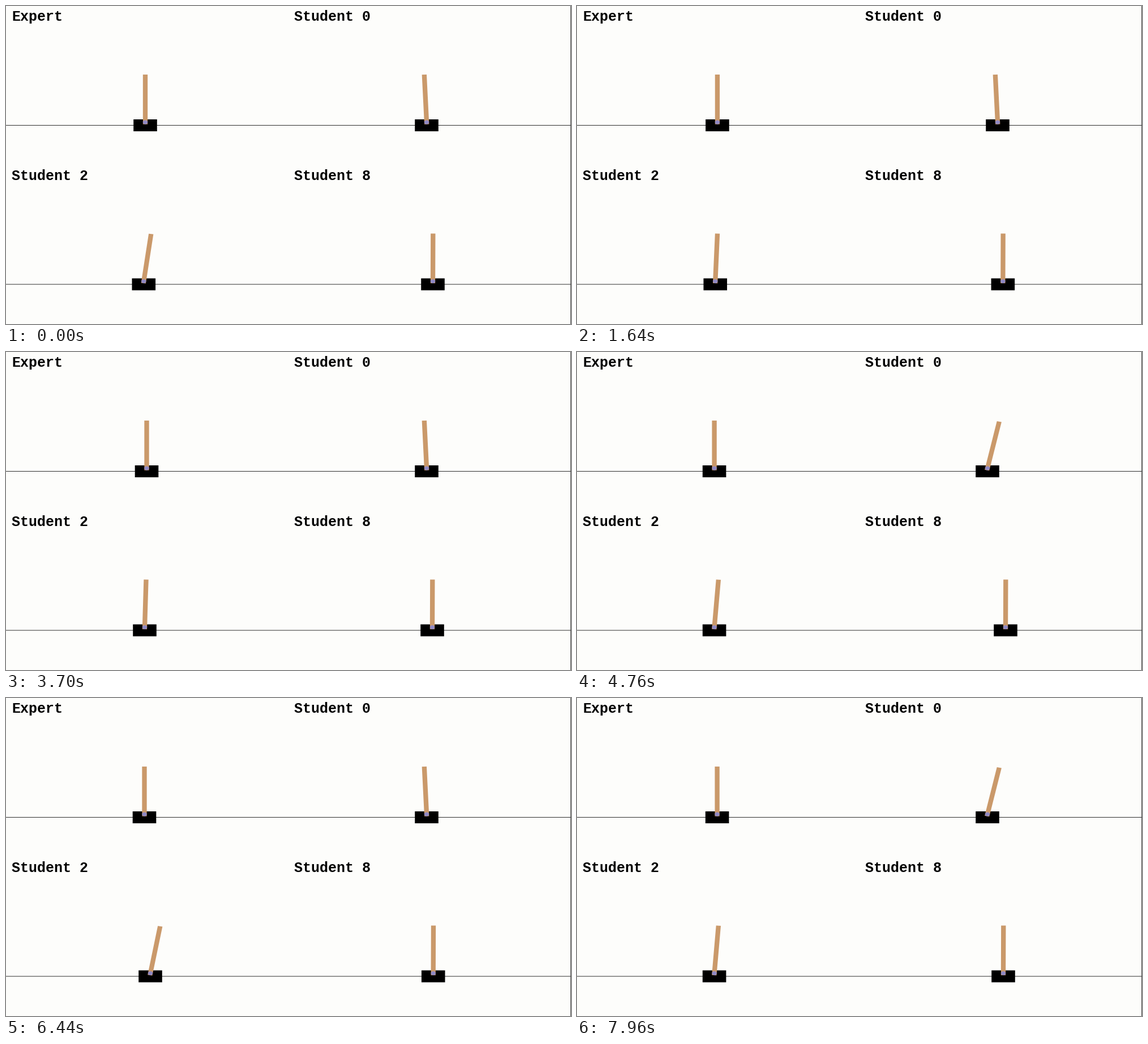
These frames come from a looping animation (998 by 561 pixels, 8 s). A matplotlib script:

```python
import numpy as np
import matplotlib.pyplot as plt
from matplotlib.animation import FuncAnimation
from matplotlib.patches import Ellipse, Polygon, Rectangle

W, H, DPI = 998, 561, 100
PANE_H = H / 2
FRAMES, STEP = 400, 20
SX, SY = W / 1200, PANE_H / 400      # a 600 x 400 view squeezed into each pane
PT = 72 / DPI
KEY_TIMES = [0, 900, 2360, 3700, 4760, 6440, 7960]


def ease(t, values):
    """Cosine easing from one key time to the next."""
    pos = np.interp(t, KEY_TIMES, range(len(KEY_TIMES)))
    k = min(int(pos), len(KEY_TIMES) - 2)
    u = (1 - np.cos(np.pi * (pos - k))) / 2
    return values[k] + (values[k + 1] - values[k]) * u


# Each pose is the cart centre in pixels and the pole angle in radians.
def expert(t):
    return ease(t, [246, 251, 245, 248.5, 242.6, 244.5, 247.6]), 0


def student_0(t):
    # pushes left at every step until the pole passes twelve degrees
    n = int(0.75 + t / 48.48) % 11
    push = n * (n - 1)
    return 743 - 0.2 * push, -0.042 + 0.0028 * push


def student_2(t):
    # drifts left, then chases the falling pole to the right
    n = int(np.interp(t, KEY_TIMES, [10.5, 25.5, 60.5, 84.5, 109.5, 143.5, 172.5])) % 21
    x = 245 - 0.774 * n + 0.0322 * n**2 + 0.00282 * n**3
    return x, 0.025 + 0.013 * n - 0.00025 * n**2


def student_8(t):
    return ease(t, [754, 749.8, 754.8, 753, 757, 754.7, 753]), 0.003


class CartPole:
    def __init__(self, pose, top):
        self.pose = pose
        self.pivot = top + PANE_H - 107.5 * SY
        self.cart = Rectangle((0, top + 200), 50 * SX, 30 * SY, fc="black",
                              lw=0, snap=False, zorder=2)
        self.pole = Polygon(np.zeros((4, 2)), fc="#ca996a", lw=0, snap=False, zorder=3)
        self.axle = Ellipse((0, self.pivot), 10 * SX, 10 * SY, fc="#9089c4",
                            lw=0, zorder=4)
        self.parts = [self.cart, self.pole, self.axle]
        for part in self.parts:
            ax.add_patch(part)

    def place(self, t):
        x, angle = self.pose(t)
        c, s = np.cos(angle), np.sin(angle)
        u = np.array([-5, -5, 5, 5])
        v = np.array([-5, 120, 120, -5])
        self.pole.set_xy(np.column_stack([x + SX * (u * c + v * s),
                                          self.pivot - SY * (v * c - u * s)]))
        self.cart.set_x(x - 25 * SX)
        self.axle.set_center((x, self.pivot))
        return self.parts


fig = plt.figure(figsize=((W + 0.01) / DPI, (H + 0.01) / DPI), dpi=DPI,
                 facecolor="#fdfdfb")
ax = fig.add_axes([0, 0, 1, 1])
ax.set_xlim(0, W)
ax.set_ylim(H, 0)
ax.axis("off")

panes = [("Expert", expert), ("Student 0", student_0),
         ("Student 2", student_2), ("Student 8", student_8)]
carts = []
for i, (name, pose) in enumerate(panes):
    left, top = i % 2 * W / 2, i // 2 * PANE_H
    ax.text(left + 10, top + 26.2, name, family="Liberation Mono", weight="bold",
            size=25 * PT, color="black", va="baseline", zorder=5)
    ax.plot([left, left + W / 2], [top + 210.5] * 2, color="#303030", lw=PT,
            snap=False, solid_capstyle="butt", zorder=1)
    carts.append(CartPole(pose, top))
ax.plot([W - 0.5] * 2, [0, H], color="#404040", lw=PT, snap=False, zorder=1)


def draw(i):
    return [part for cart in carts for part in cart.place(i * STEP)]


anim = FuncAnimation(fig, draw, frames=FRAMES, interval=STEP, repeat=True,
                     repeat_delay=0, blit=False)
plt.show()
```
